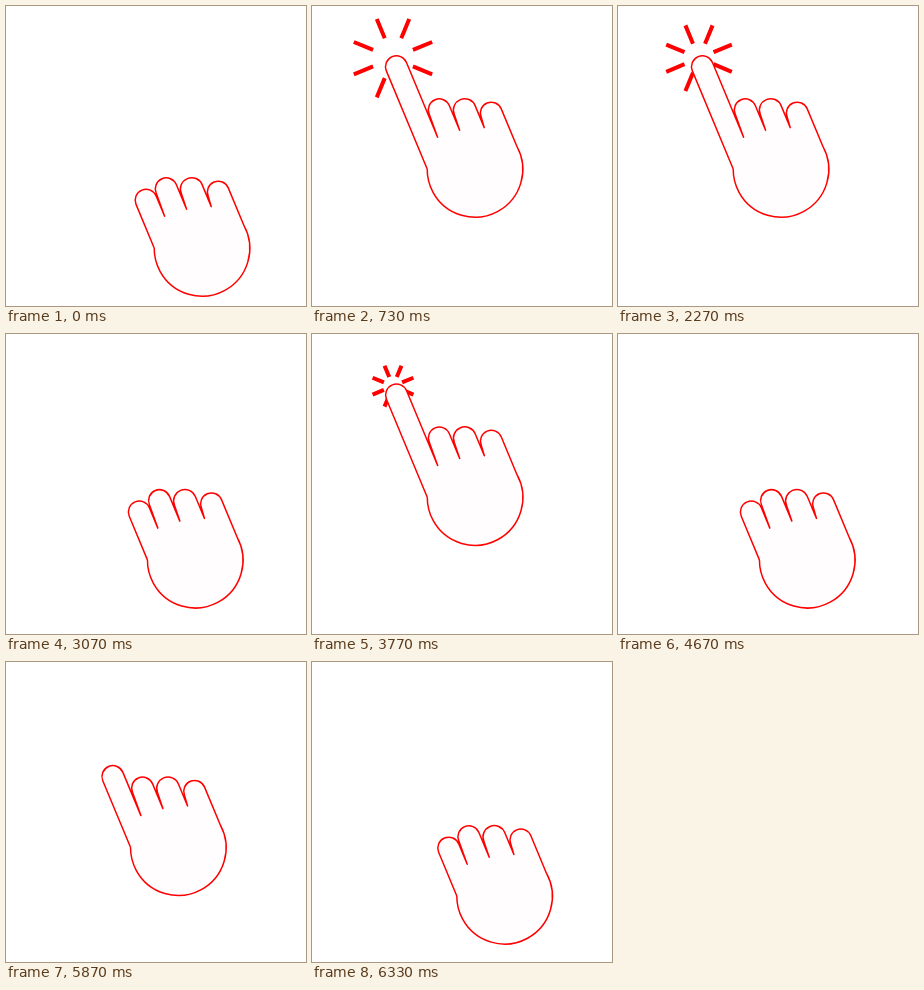
An HTML page with a canvas for the animation above (6.41 s loop, 300x300 px).

```html
<!DOCTYPE html>
<html lang="en">
<head>
<meta charset="utf-8">
<title>Tapping hand</title>
<style>
  html, body { margin: 0; width: 100%; height: 100%; overflow: hidden; background: #fff; }
  canvas { display: block; width: 300px; height: 300px; }
</style>
</head>
<body>
<canvas id="stage" width="300" height="300"></canvas>
<script>
const ctx = document.getElementById('stage').getContext('2d');
const LOOP = 6410;
const STEP_TIMES = [0, 100, 170, 270, 330];
const STEPS_PER_TAP = 20;
const TILT = -22.6 * Math.PI / 180;
const RED = '#ff0000';
const PALM = 47.8;

const clamp = x => Math.max(0, Math.min(1, x));
const progress = (step, from, to) => clamp((step - from) / (to - from));
const easeOut = x => 1 - (1 - x) ** 3;

// The motion is held on an uneven five-step beat of 400 ms.
function stepAt(ms) {
  const beat = Math.min(15, Math.floor(ms / 400));
  const rest = ms - beat * 400;
  return (beat * 5 + STEP_TIMES.filter(t => t <= rest).length - 1) % STEPS_PER_TAP;
}

function drawBurst(step) {
  if (step <= 6 || step >= 13) return;
  const outer = 45.3 * easeOut(progress(step, 6, 11));
  const inner = 4 + 41 * progress(step, 6, 13);
  ctx.save();
  ctx.translate(81, 52.2);
  ctx.rotate(Math.PI / 8);
  ctx.lineWidth = 4;
  ctx.beginPath();
  for (let i = 0; i < 8; i++) {
    ctx.moveTo(inner, 0);
    ctx.lineTo(outer, 0);
    ctx.rotate(Math.PI / 4);
  }
  ctx.stroke();
  ctx.restore();
}

// One finger: left edge, right edge, height of the cap centre, depth of the gap after it.
function addFinger(left, right, cap, base) {
  const radius = (right - left) / 2;
  ctx.arc(left + radius, -cap, radius, Math.PI, 2 * Math.PI);
  ctx.lineTo(right, -base);
}

function drawHand(lowered, reach) {
  ctx.save();
  ctx.translate(163 + 33 * lowered, 163.4 + 79 * lowered);
  ctx.rotate(TILT);
  ctx.beginPath();
  ctx.moveTo(-44, -18.7);
  addFinger(-44, -22.2, 66 + 59 * reach, 44);
  addFinger(-21, 0.8, 68.8, 42);
  addFinger(2, 24.6, 58.8, 35);
  addFinger(25.8, 47.5, 45.8, 5);
  ctx.arc(0, 0, PALM, Math.atan2(-5, 47.5), Math.atan2(-18.7, -44), false);
  ctx.closePath();
  ctx.fillStyle = '#fffdfd';
  ctx.fill();
  ctx.lineWidth = 1.5;
  ctx.stroke();
  ctx.restore();
}

function render(ms) {
  const step = stepAt(ms);
  const rise = easeOut(progress(step, 0.1, 8));
  const lowered = 1 - rise + progress(step, 10.25, 20);
  const reach = rise - progress(step, 10.25, 15);
  ctx.fillStyle = '#fff';
  ctx.fillRect(0, 0, 300, 300);
  ctx.strokeStyle = RED;
  ctx.lineJoin = 'round';
  drawBurst(step);
  drawHand(lowered, reach);
}

const start = performance.now();
function tick() {
  render((performance.now() - start) % LOOP);
  requestAnimationFrame(tick);
}
tick();
</script>
</body>
</html>
```
